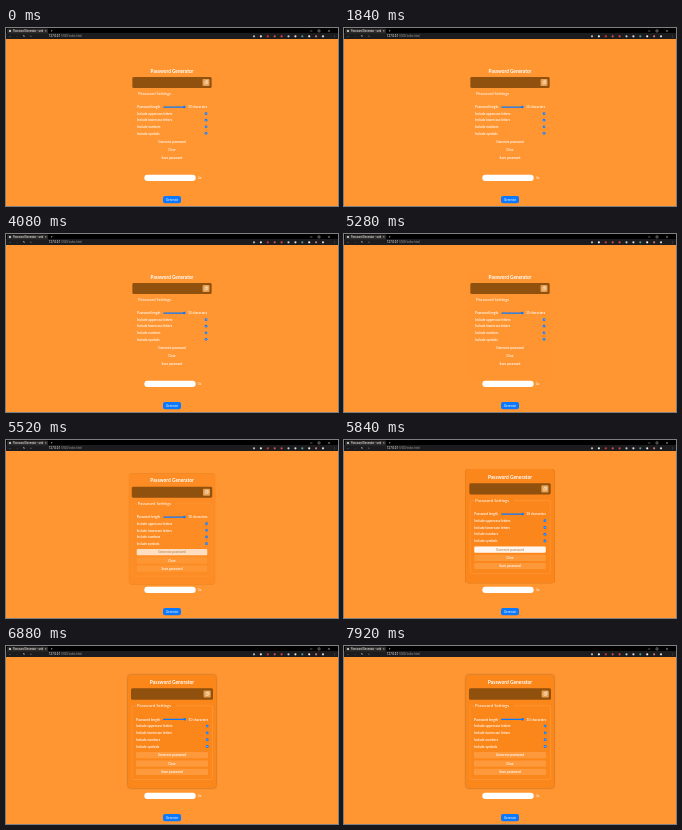
An HTML page that plays this animation: 332x178 px, repeating every 8000 ms.

```html
<!DOCTYPE html>
<html lang="en">
<head>
<meta charset="utf-8">
<title>Password Generator</title>
<style>
  html, body { margin: 0; width: 100%; height: 100%; overflow: hidden; background: #ff9632; }
  svg { display: block; width: 100vw; height: 100vh; }
  text { font-family: Lato, sans-serif; fill: #fff; }
  .row { font-size: 3.3px; font-weight: 600; }
  .mid { text-anchor: middle; }
  .url { font: 2.8px Roboto, sans-serif; }
  #panel { filter: drop-shadow(0 .4px .8px rgba(90, 40, 0, .5)); }
</style>
</head>
<body>
<svg viewBox="0 0 332 178">
  <rect width="332" height="178" fill="#ff9632"/>
  <g id="browser">
    <rect width="332" height="11" fill="#1c1c1e"/>
    <rect width="332" height="5" fill="#000"/>
    <rect x="1" y="0.6" width="41" height="5" rx="1" fill="#2c2a29"/>
    <circle cx="4" cy="3" r="1.1" fill="#ddd"/>
    <text class="url" x="7" y="4" style="font-size:2.6px">Password Generator - web</text>
    <text class="url" x="39" y="4">×</text>
    <text class="url" x="45" y="4">+</text>
    <text class="url" x="3" y="9.3">←</text>
    <text class="url" x="10" y="9.3" opacity=".5">→</text>
    <text class="url" x="17" y="9.3">↻</text>
    <text class="url" x="24" y="9.3">⌂</text>
    <text class="url" x="43" y="9.3">127.0.0.1<tspan fill="#999">:5500/index.html</tspan></text>
    <path d="M304 3h2.4M312 1.9h2v2h-2zM322 1.9l2 2m0-2l-2 2" fill="none" stroke="#ddd" stroke-width=".4"/>
  </g>

  <g id="card">
    <rect id="panel" rx="3" fill="#fb861a"/>
    <path id="frame" fill="none" stroke="#ffb066" stroke-width=".5"
      d="M130 59.8H127.5Q126 59.8 126 61.3V132Q126 133.5 127.5 133.5H205Q206.5 133.5 206.5 132V61.3Q206.5 59.8 205 59.8H170"/>
    <text class="mid" x="166" y="38" font-size="4.9" font-weight="700">Password Generator</text>
    <rect x="125" y="42.3" width="82" height="11.4" rx="1.5" fill="#90500e"/>
    <rect x="197.6" y="44.4" width="7.2" height="7.2" rx="1" fill="#e8a050"/>
    <path d="M200 46.8h2v2.6h-2zM201 46.8v-.8h2v2.6h-1" fill="none" stroke="#fff" stroke-width=".45"/>
    <text x="131" y="61" font-size="4.3">Password Settings</text>
    <g id="rows"></g>
    <rect x="157" y="72.7" width="22" height="1.3" rx=".6" fill="#0a78ff"/>
    <circle cx="178.7" cy="73.3" r="1.3" fill="#0a78ff"/>
    <text class="row" x="182.5" y="74.5">10 characters</text>
    <g id="buttons"></g>
  </g>

  <rect x="138.3" y="146.7" width="51.4" height="6.3" rx="3" fill="#fff"/>
  <text x="191.7" y="151" font-size="2.8">Go</text>
  <rect x="157" y="168" width="18" height="7.2" rx="2" fill="#0a78ff"/>
  <text class="mid" x="166" y="172.6" font-size="3">Generate</text>
</svg>
<script>
const $ = id => document.getElementById(id);

function add(parent, tag, attrs, label = '') {
  const el = document.createElementNS('http://www.w3.org/2000/svg', tag);
  for (const key in attrs) el.setAttribute(key, attrs[key]);
  el.textContent = label;
  return parent.appendChild(el);
}

['#bbb', '#eee', '#d33', '#c55', '#d44', '#bcd', '#ddd', '#599', '#eee', '#c77', '#ddd'].forEach((fill, i) =>
  add($('browser'), 'circle', { cx: 248 + i * 6.9, cy: 8.3, r: 1.1, fill }));
add($('browser'), 'text', { class: 'url', x: 327, y: 9.3 }, '⋮');

['Password length', 'Include uppercase letters', 'Include lowercase letters',
 'Include numbers', 'Include symbols'].forEach((label, i) => {
  const y = 73.3 + i * 6.8;
  add($('rows'), 'text', { class: 'row', x: 130, y: y + 1.2 }, label);
  if (!i) return;
  add($('rows'), 'circle', { cx: 201.2, cy: y, r: 1.45, fill: '#0a78ff' });
  add($('rows'), 'path', { d: `M200.5 ${y}l.5 .5 1-1`, fill: 'none', stroke: '#fff', 'stroke-width': .4 });
});

const buttons = ['Generate password', 'Clear', 'Save password'].map((label, i) => {
  const y = 106 + i * 8.4;
  const box = add($('buttons'), 'rect', { x: 130, y, width: 72, height: 6.3, rx: 1, fill: '#ff9f45' });
  const text = add($('buttons'), 'text', { class: 'row mid', x: 166, y: y + 4.3 }, label);
  return { box, text };
});
const glow = add($('buttons'), 'rect', { x: 130, y: 106, width: 72, height: 6.3, rx: 1, fill: '#fff' });
$('buttons').insertBefore(glow, buttons[0].text);

// Linear interpolation through [time, value] pairs
function track(t, keys) {
  const next = keys.findIndex(([time]) => time > t);
  if (next === 0) return keys[0][1];
  if (next < 0) return keys[keys.length - 1][1];
  const [t0, a] = keys[next - 1], [t1, b] = keys[next];
  return a + (b - a) * (t - t0) / (t1 - t0);
}

function draw(now) {
  const t = now % 8000;
  const drop = track(t, [[5280, 7], [5520, 4.5], [5840, 1], [6000, 0]]);
  const scale = track(t, [[5280, .967], [5520, .98], [5840, .992], [6000, 1]]);
  const shown = track(t, [[5280, 0], [5520, .6], [5840, .95], [6000, 1]]);
  const grow = track(t, [[5520, 0], [5760, 1], [5840, 1], [6080, 0]]);
  const hover = track(t, [[5280, 0], [5520, .75], [5760, 1], [5840, 1], [6080, 0]]);

  $('card').setAttribute('transform',
    `translate(166 ${36 + drop}) scale(${scale}) translate(-166 -36)`);
  const box = { x: 122 - grow, y: 29 - grow, width: 88 + 2 * grow, height: 113 + 2 * grow };
  for (const key in box) $('panel').setAttribute(key, box[key]);
  $('panel').style.opacity = shown;
  $('frame').style.opacity = shown * .7;
  buttons.forEach(b => b.box.style.opacity = shown * .8);
  glow.style.opacity = hover * .92;
  buttons[0].text.style.fill = hover > .4 ? '#b98a5c' : '#fff';
  requestAnimationFrame(draw);
}
requestAnimationFrame(draw);
</script>
</body>
</html>
```
